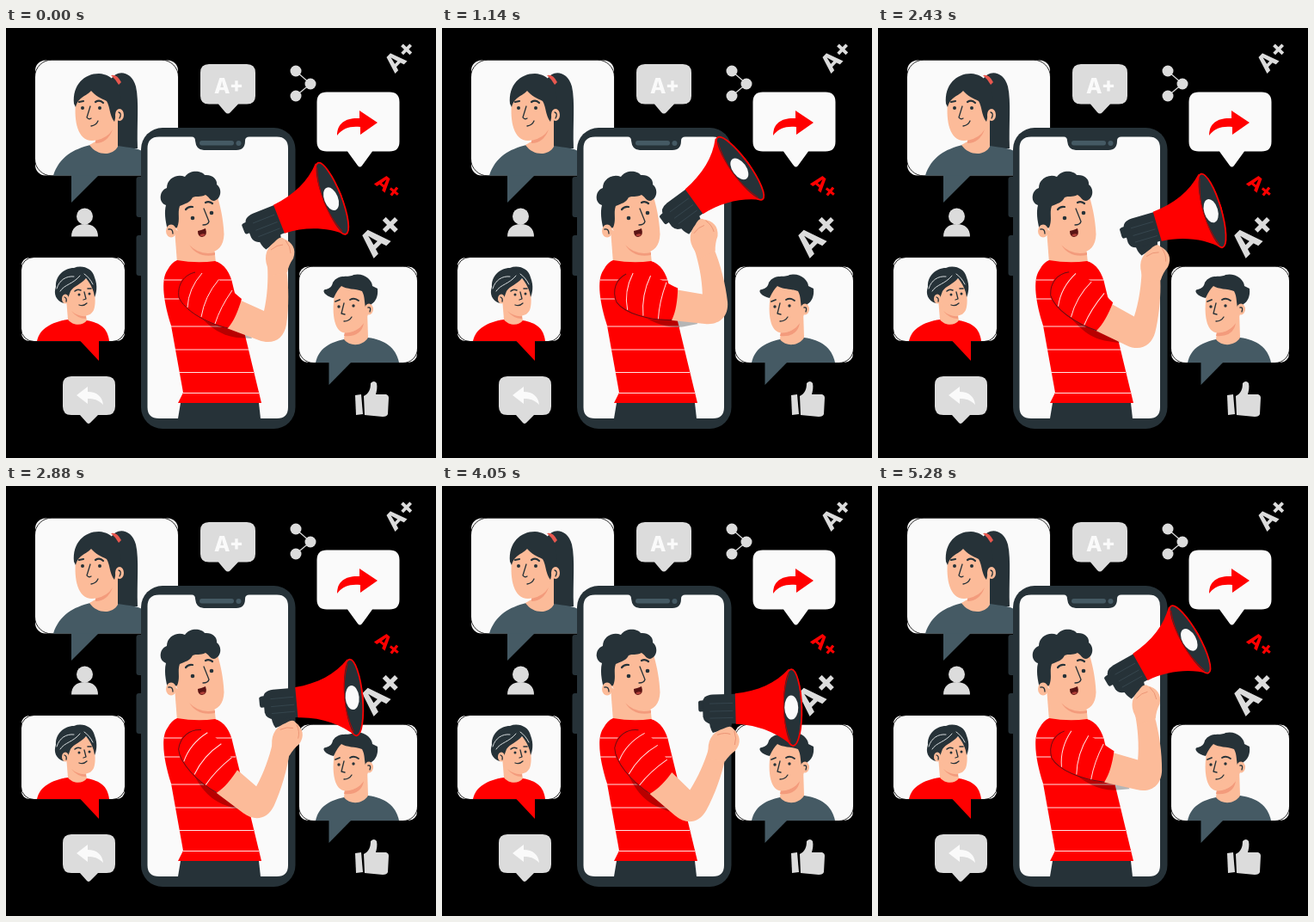
Recreate the animation shown at these times as an HTML page. Size 500 by 500 pixels, loop 5.31 s.

```html
<!DOCTYPE html>
<html lang="en">
<head>
<meta charset="utf-8">
<title>Megaphone</title>
<style>
  html, body { margin: 0; width: 100%; height: 100%; overflow: hidden; background: #000; }
  svg { display: block; width: 100vw; height: 100vh; }
  text { font-family: Inter, Lato, sans-serif; font-weight: 800; }
  .white { fill: #fafafa; }
  .grey { fill: #dcdcdc; }
  .dark { fill: #263238; }
  .slate { fill: #455a64; }
  .red { fill: #f00; }
  .skin { fill: #fcbb99; }
  .blush { fill: #f39b7c; }
  .line { fill: none; stroke: #263238; stroke-width: 1.3; stroke-linecap: round; stroke-linejoin: round; }
  .brow { fill: none; stroke: #263238; stroke-width: 2.2; stroke-linecap: round; }
  .edge { fill: none; stroke: #111; stroke-width: .9; }
  .stripe { fill: none; stroke: #ffe4e4; stroke-width: 1; }
  .shine { fill: none; stroke: #e8ecee; stroke-width: .9; stroke-linecap: round; }
</style>
</head>
<body>
<svg viewBox="0 0 500 500">
  <rect width="500" height="500"/>

  <!-- woman bubble -->
  <rect class="white" x="34" y="37.500" width="166" height="134" rx="12"/>
  <rect class="edge" x="33.500" y="37" width="167" height="135" rx="20"/>
  <path class="slate" d="M76 170H109L76 203Z"/>
  <path class="dark" d="M122 60C128 48 146 49 151 68C155 86 152 112 153 140H129L130 95Z"/>
  <path fill="#e8584f" d="M122 55Q129 53 134 63L131 66Q128 60 122 55Z"/>
  <path class="slate" d="M55 171.500C62 150 78 141 98 136L130 137C144 139 154 140 160 144V171.500Z"/>
  <path class="skin" d="M104 122L130 104V138C124 149 106 149 97 136L104 132Z"/>
  <path class="skin" d="M81 86C79 108 83 131 100 131C113 131 124 122 128 110L131 84C120 62 92 58 81 86Z"/>
  <path class="blush" d="M104 131Q118 128 124 118Q118 134 104 134Z"/>
  <path class="dark" d="M79 88C77 66 91 53 108 53C125 54 134 68 134 86L132 96C127 93 128 105 126 109C120 101 121 91 117 85C111 82 104 79 99 73C94 79 84 80 81 92Z"/>
  <ellipse class="skin" cx="132" cy="101" rx="5" ry="7"/>
  <path class="line" d="M131 98Q135 99 132 105M98 91L94 104Q96 107 99 105M99 114Q105 113 107 108"/>
  <path class="brow" d="M85 86L90 85M104 86Q109 83 113 87"/>
  <circle class="dark" cx="89" cy="93" r="2"/><circle class="dark" cx="109" cy="93" r="2"/>

  <!-- left bubble -->
  <rect class="white" x="18" y="267" width="120" height="97" rx="9"/>
  <rect class="edge" x="17.500" y="266.500" width="121" height="98" rx="15"/>
  <path class="red" d="M85 362.500H108V387Z"/>
  <path class="red" d="M36 364C39 350 52 342 72 339L94 340C110 343 118 349 120 364Z"/>
  <path class="skin" d="M70 314L72 339C78 347 90 346 94 340L92 328Z"/>
  <path class="blush" d="M76 329Q84 336 93 335V338Q83 338 76 329Z"/>
  <path class="skin" d="M70 306L78 292L98 292C104 304 105 320 102 328C97 338 84 336 75 325Z"/>
  <path class="dark" d="M67 320C58 317 55 309 58 301C57 289 67 279 79 279C89 275 101 280 103 290C107 300 105 309 103 313C102 304 98 297 93 291C87 298 79 300 75 306L71 317Z"/>
  <path class="shine" d="M59 303C62 293 70 288 79 289M63 306C68 298 78 298 86 288M91 286Q97 290 101 298"/>
  <ellipse class="skin" cx="69" cy="315" rx="4" ry="5.500"/>
  <path class="line" d="M68 313Q71 314 70 318M91 307L93 315L90 316M85 322Q90 324 94 320"/>
  <path class="brow" style="stroke-width:1.600" d="M80 306Q83 303 87 305M95 303L99 303"/>
  <circle class="dark" cx="85" cy="310" r="1.500"/><circle class="dark" cx="97" cy="309" r="1.500"/>

  <!-- right bubble -->
  <text class="grey" font-size="39" transform="translate(427 268.500) rotate(-45)">A+</text>
  <rect class="white" x="341" y="277.500" width="137" height="111.500" rx="10"/>
  <rect class="edge" x="340.500" y="277" width="138" height="112.500" rx="17"/>
  <path class="slate" d="M375.500 387H403L375.500 415Z"/>
  <path class="slate" d="M360 389C364 372 376 366 393 362L421 360C441 363 453 371 457 389Z"/>
  <path class="skin" d="M395 345L393 362C400 371 415 370 421 360L420 328Z"/>
  <path class="blush" d="M394 354Q409 354 416 343Q413 360 393 358Z"/>
  <path class="skin" d="M382 310C379 328 380 353 394 354.500C407 355 417 345 421 333L424 308L400 296L385 300Z"/>
  <path class="dark" d="M381 314C369 311 367 304 372 304C376 303 379 301 380 296C387 285 399 291 404 287C416 284 426 293 426 300L432 303C433 312 430 318 425 321L419 328C416 320 418 313 414 306C406 303 396 304 390 300C387 303 384 307 381 314Z"/>
  <ellipse class="skin" cx="422" cy="327" rx="5" ry="6.500"/>
  <path class="line" d="M421 325Q425 324 423 330M393 320L390 332L394 333M393 341Q399 341 402 336"/>
  <path class="brow" style="stroke-width:1.800" d="M383 318L388 316M400 316Q405 313 410 317"/>
  <circle class="dark" cx="387" cy="324" r="1.700"/><circle class="dark" cx="404" cy="323" r="1.700"/>

  <!-- small symbols -->
  <path class="grey" d="M236 42H280Q290 42 290 52V79Q290 88.500 280 88.500H270L261 98Q258 101 255 98L247 88.500H236Q226 88.500 226 79V52Q226 42 236 42Z"/>
  <text class="white" font-size="24" x="242" y="76">A+</text>
  <path class="grey" d="M76 405H117Q127 405 127 415V440Q127 450 117 450H107L98 459Q96 461 94 459L86 450H76Q66 450 66 440V415Q66 405 76 405Z"/>
  <path class="white" d="M82 427L95 417V423C106 423 112 429 113 438C107 432 102 431 95 431V437Z"/>
  <text class="grey" font-size="28" transform="translate(452 53.500) rotate(-46)">A+</text>
  <text class="red" font-size="22.500" transform="translate(427.500 181) rotate(39)">A+</text>
  <path d="M337 50L354 65L337 79" fill="none" stroke="#dcdcdc" stroke-width="1.200"/>
  <g class="grey"><circle cx="337" cy="50" r="6.500"/><circle cx="354" cy="65" r="6.500"/><circle cx="337" cy="79" r="6.500"/>
    <circle cx="91.500" cy="219" r="9.500"/><path d="M76 242.500C76 233 82 228 91.500 228S107 233 107 242.500Z"/>
    <path d="M406 427L413 426L415 449L407 450Z"/>
    <path d="M416 428C422 425 424 420 424 413Q428 409 431 413C432 418 431 422 430 426H442Q445 427 445 430L444 449Q443 452 438 452L417 450Z"/>
  </g>
  <path class="white" d="M373 74.500H446Q457.500 74.500 457.500 86V132Q457.500 143.500 446 143.500H426L414 160Q411.500 163 409 160L397 143.500H373Q361.500 143.500 361.500 132V86Q361.500 74.500 373 74.500Z"/>
  <path class="red" d="M385 125C385 110 396 104 411 105V96L432 110L412 124V115C400 114 392 116 385 125Z"/>

  <!-- phone -->
  <rect class="dark" x="151.500" y="173" width="10" height="47" rx="3"/>
  <rect class="dark" x="151.500" y="241" width="10" height="47" rx="3"/>
  <rect class="dark" x="157" y="116" width="179.500" height="350" rx="25"/>
  <path class="white" d="M178 126.500H216Q220 126.500 220 131Q221 142 230 142H268Q278 142 278 131Q278 126.500 283 126.500H315Q328 126.500 328 140V441Q328 454 315 454H178Q164.500 454 164.500 441V140Q164.500 126.500 178 126.500Z"/>
  <rect class="slate" x="225" y="131" width="40" height="5.500" rx="2.700"/>
  <circle class="slate" cx="270.500" cy="134" r="3"/>

  <!-- man -->
  <path class="dark" d="M203 436H294L296 454H200Z"/>
  <path class="skin" d="M196 234L199 273Q222 280 244 273L242 255Z"/>
  <path class="blush" d="M213 252Q225 265 243 261V264Q223 268 213 252Z"/>
  <path class="red" d="M199 270Q222 274 243 271C254 274 261 285 264 300L275 345L297 436H200L206 424L192 346C184 321 179 293 188 281Q192 273 199 270Z"/>
  <path class="stripe" d="M184 293H262M184 315H267M191 347H275M197 374H282M201 400.500H288M206 424.500H294"/>
  <path class="skin" d="M200 205L215 190H244C249 205 253 223 253.500 240C253 256 243 264 229 260C218 257 210 251 203 241L196 230Z"/>
  <path class="dark" d="M188 235C185 223 184 214 186 206C177 203 178 189 187 186C187 175 199 169 208 173C214 164 228 166 231 171C240 170 246 176 245 182C252 187 250 199 242 201C237 201 236 196 232 194C226 197 221 195 217 197C214 203 209 204 202 207C199 216 203 222 199 232Z"/>
  <ellipse class="skin" cx="192" cy="236" rx="6" ry="7.500"/>
  <path class="line" d="M189 234Q194 233 194 239M230 210L236 225Q235 229 229 229"/>
  <path class="brow" d="M209 211Q212 207 217 208M232 203Q236 201 240 204"/>
  <circle class="dark" cx="217" cy="221" r="2.300"/><circle class="dark" cx="239" cy="215" r="2.300"/>
  <path d="M223 236Q228 235 232 233Q235 242 228 243Q223 243 223 236Z" fill="#5a1414"/>
  <path d="M225 241Q228 238 232 240Q229 244 225 241Z" fill="#b04038"/>

  <!-- arm and megaphone -->
  <g id="arm">
    <path d="M218 328L262 342L280 349L286 361L268 360C248 357 236 347 218 328Z" fill="#000" opacity=".28"/>
    <path class="skin" d="M269 315L300 329C304 312 305 292 304 276L326 280C329 300 329 325 326 345C323 362 310 369 294 363L254 348Z"/>
    <path class="red" d="M200 304C202 288 218 280 235 286C251 293 263 306 274 315C270 329 265 341 258 349C241 346 224 338 211 327C201 319 199 311 200 304Z"/>
    <path d="M201 313C199 298 207 287 220 284M201 313C207 328 232 343 258 349" fill="none" stroke="#6b0d12" stroke-width="1"/>
    <path class="stripe" d="M228 285Q212 303 211 325M247 293Q231 312 227 336M263 305Q249 325 243 344"/>
    <g transform="translate(379 198.300) rotate(-21.500)">
      <path class="dark" d="M-109-9Q-109-11-103-11V2H-107Q-109 2-109-1Z"/>
      <path class="dark" d="M-97 10H-69L-72 21L-93 27Q-97 21-97 10Z"/>
      <path class="dark" d="M-65-17.500H-92Q-104-17-104-8V8Q-103 16-93 17H-65Z"/>
      <path d="M-96-7H-69M-96 2H-69M-96 10H-69" stroke="#3b4c55" stroke-width=".7"/>
      <path class="red" d="M-66-18C-40-20-18-29-3-45Q12-20 12 0T-1 45C-16 30-40 19-66 17.500Z"/>
      <ellipse class="dark" cx="0" cy="0" rx="11" ry="44.500" stroke="#f00" stroke-width="1.800"/>
      <ellipse class="white" cx="-1" cy="0" rx="8" ry="14"/>
      <path d="M-3-40Q-17 0-3 40" fill="none" stroke="#b30000" stroke-width="1"/>
    </g>
    <path class="skin" d="M304 278C299 264 304 255 312 249Q319 241 323 245C333 249 338 257 334 268Q329 275 327 284L308 288Z"/>
    <path d="M308 258Q315 252 322 252M325 247Q331 254 331 262" fill="none" stroke="#e98f70" stroke-width=".8"/>
  </g>
</svg>
<script>
  const LOOP = 5310, STEP = 30;
  // time in ms, arm angle in degrees
  const swing = [[0, 0], [1080, -13.9], [1380, -16.9], [1540, -16.6], [1680, -13.7],
                 [2430, 5.1], [3510, 32], [4050, 20], [5310, -8.5]];
  const arm = document.getElementById('arm');

  function angleAt(t) {
    const i = swing.findIndex(k => k[0] > t);
    const [t0, a0] = swing[i - 1], [t1, a1] = swing[i];
    return a0 + (a1 - a0) * (t - t0) / (t1 - t0);
  }

  const start = performance.now();
  function draw() {
    const t = (performance.now() - start) % LOOP;
    const held = Math.floor(t / STEP) * STEP;
    arm.setAttribute('transform', `rotate(${angleAt(held).toFixed(2)} 225 308)`);
    requestAnimationFrame(draw);
  }
  draw();
</script>
</body>
</html>
```
